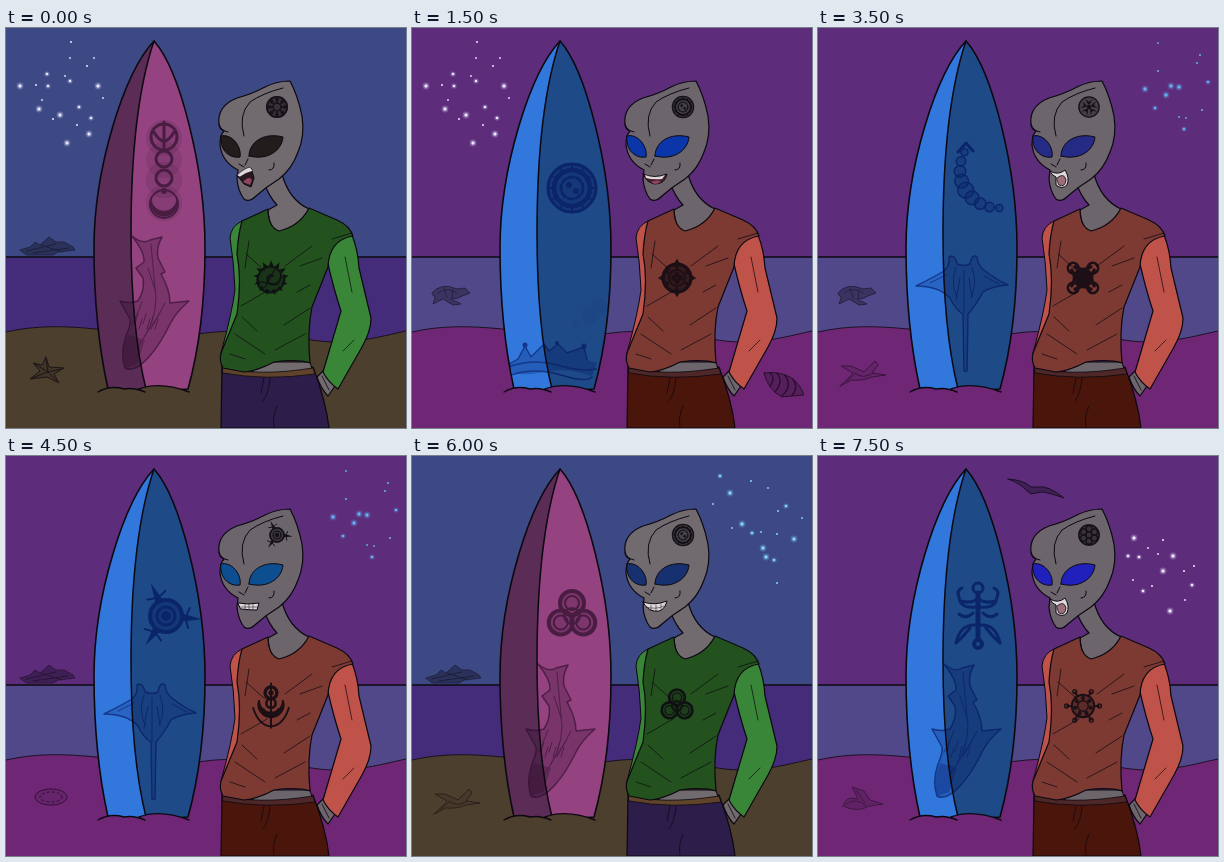
Animation of 400x400 px, one loop 8 s. Source, as an HTML page:

```html
<!DOCTYPE html>
<html lang="en">
<head>
<meta charset="utf-8">
<title>Alien surfer</title>
<style>
html, body { margin: 0; width: 100%; height: 100%; overflow: hidden; background: #000; }
svg { display: block; width: 100vw; height: 100vh; color: #0c0810; stroke-linejoin: round; stroke-linecap: round; }
</style>
</head>
<body>
<svg id="stage" viewBox="0 0 400 400"></svg>
<script>
const STEP = 500;
const INK = 'currentColor';

const path = (d, fill = 'none', stroke = 'none', width = 1, extra = '') =>
  `<path d="${d}" fill="${fill}" stroke="${stroke}" stroke-width="${width}" ${extra}/>`;
const line = (d, width = 1) => path(d, 'none', INK, width);
const dot = (x, y, r, fill = INK) => `<circle cx="${x}" cy="${y}" r="${r}" fill="${fill}"/>`;
const ring = (x, y, r, width = 2, dash = '') =>
  `<circle cx="${x}" cy="${y}" r="${r}" fill="none" stroke="${INK}" stroke-width="${width}" stroke-dasharray="${dash}"/>`;
const group = (body, transform = '', opacity = 1) =>
  `<g transform="${transform}" opacity="${opacity}">${body}</g>`;
const repeat = (n, draw) => Array.from({ length: n }, (_, i) => draw(i)).join('');
const around = (n, body, start = 0) => repeat(n, i => group(body, `rotate(${start + i * 360 / n})`));
const haze = (r, alpha = .35, y = 0) => `<circle cy="${y}" r="${r}" fill="${INK}" opacity="${alpha}"/>`;

const themes = {
  green: { sky: '#3c4985', sea: '#452c7a', sand: '#4d3f2d', boardL: '#5b2c56', boardR: '#944380', ink: '#2a0c28',
    shirt: '#23521f', sleeve: '#398638', pants: '#2d1d4a', belt: '#5f442b', skin: '#716a6e' },
  purple: { sky: '#5d2d7c', sea: '#504888', sand: '#6f2775', boardL: '#3277dc', boardR: '#1e4a88', ink: '#04165c',
    shirt: '#7c3a33', sleeve: '#bf5349', pants: '#4a150b', belt: '#4e2728', skin: '#6c656b' },
  blue: { sky: '#0c2583', sea: '#4f2669', sand: '#305286', boardL: '#034f67', boardR: '#36379f', ink: '#0a0d45',
    shirt: '#2c3787', sleeve: '#4355c8', pants: '#4c150b', belt: '#6a254b', skin: '#6d7a86' }
};

// Emblems are drawn around the origin with a radius of about 25.
const crescent = 'M-18 -8A19 19 0 1 0 18 -8A16 16 0 1 1 -18 -8Z';
const trefoilPart = haze(0) + group(haze(13, .3) + ring(0, 0, 12, 4) + ring(0, 0, 7, 2), 'translate(0 -13)');
const emblems = {
  mandala: haze(25, .45) + ring(0, 0, 24, 3) + ring(0, 0, 18, 5, '8 3') + ring(0, 0, 11, 3, '5 3') +
    around(12, line('M0 -24V-18', 2)) + dot(-3, -3, 3) + dot(4, 3, 3),
  wheel: haze(25, .65) + ring(0, 0, 23, 4) + ring(0, 0, 9, 3) + around(8, line('M0 -9V-18', 3) + dot(0, -17, 4)),
  nautilus: path('M20 -4C24 20 -4 30 -17 15C-29 -3 -9 -25 8 -15C23 -6 12 14 -1 9C-10 4 -4 -8 3 -3', INK, INK, 3, 'fill-opacity=".5"') +
    around(13, path('M-3 -18L0 -27L4 -18Z', INK)) + line('M-15 6L10 10M-9 14L6 -14', 2),
  totem: group([-50, -28, -8, 15].map(y => haze(18, .18, y)).join('') + ring(0, -51, 13, 3) + line('M0 -66V-40M-10 -56Q0 -38 10 -56', 3) +
    ring(0, -29, 8, 3) + ring(0, -10, 8, 3) + dot(0, 3, 3) + ring(0, 16, 14, 2) +
    path(crescent, INK, INK, 1, 'transform="translate(0 16) scale(.72)"'), 'translate(-2 0)'),
  gear: haze(23, .75) + ring(0, 0, 21, 5) + ring(0, 0, 12, 3) + around(4, dot(0, -5, 4) + path('M-5 -21L0 -29L5 -21Z', INK)) +
    around(6, dot(0, -17, 3)),
  beads: repeat(9, i => {
    const a = (i * 15 - 28) * Math.PI / 180, r = 8 - Math.abs(i - 4) * 1.1;
    const x = 20 - 38 * Math.cos(a), y = -18 + 38 * Math.sin(a);
    return `<circle cx="${x}" cy="${y}" r="${r}" fill="${INK}" fill-opacity=".35" stroke="${INK}" stroke-width="1.5"/>`;
  }) + line('M-20 -36L-12 -45L-5 -37', 3),
  moons: haze(24, .45) + ring(0, 0, 23, 3) + around(5, path('M-8 -20Q0 -5 8 -20Q4 -8 0 -5Q-5 -8 -8 -20', INK)) + dot(0, 0, 5),
  knot: dot(0, 0, 13) + around(4, ring(0, -21, 8, 4), 45) + around(4, line('M-12 -17Q0 -9 12 -17', 5)),
  spikes: haze(17, .5) + ring(0, 0, 16, 4) + ring(0, 0, 9, 3) + dot(0, 0, 5) +
    around(3, path('M-4 -16L0 -36L4 -16Z', INK) + line('M-10 -23Q0 -18 10 -23', 2), -25),
  altar: ring(0, -20, 9, 5) + dot(0, -20, 4) + ring(0, -4, 7, 4) + path(crescent, INK, INK, 3) +
    line('M-27 3Q-19 29 0 31Q19 29 27 3M-11 5Q0 20 11 5M0 -34V33', 3),
  waves: dot(-6, 5, 6) + ring(-6, 5, 10, 3) + line('M-14 -14A22 22 0 0 1 13 14M-10 -22A29 29 0 0 1 21 14M-23 0L-14 9M-20 16L-8 20', 5),
  pinwheel: haze(25, .15) + ring(0, 0, 25, 2) + around(6, path('M-11 -19L9 -19L15 -11L3 -10L-5 -6Z', INK)),
  dots: haze(13, .75) + around(10, dot(0, -20, 6) + ring(0, -20, 6, 2)) + ring(0, 0, 12, 3) + dot(0, 0, 7),
  trefoil: around(3, trefoilPart) + ring(0, 0, 8, 2),
  flower: haze(25, .6) + ring(0, 0, 23, 3) + around(6, ring(0, -14, 7, 3)) + ring(0, 0, 7, 3),
  glyph: repeat(2, i => group(line('M2 -9Q18 -7 19 -19Q22 -25 16 -28M2 9Q18 8 22 27Q14 20 8 12M0 -17Q8 -12 17 -15M5 -3Q12 4 19 -2', 3),
    `scale(${i ? -1 : 1} 1)`)) + ring(0, -28, 5, 3) + line('M0 -23V23', 5) + ring(0, 28, 4, 4),
  knobs: haze(18, .35) + ring(0, 0, 17, 3) + ring(0, 0, 8, 2) + around(7, dot(0, -12, 3)) +
    around(6, line('M0 -18V-24', 3) + ring(0, -25, 3, 2), 30)
};

const seaLife = {
  shark: path('M126 208Q137 217 144 212L156 209Q150 219 152 230L159 244L155 246Q164 262 164 275L183 273Q170 284 164 296Q154 317 142 330Q128 345 119 340Q114 325 120 308Q125 297 124 291L114 273Q124 276 132 273Q139 262 137 250L130 240L138 234Q139 224 126 208Z', INK, INK, 1.5, 'fill-opacity=".38"') +
    path('M119 340Q114 325 122 307L139 312L131 336Z', INK, 'none', 1, 'opacity=".55"') +
    line('M145 216Q148 250 150 270Q150 295 131 320M136 274Q130 290 126 296M159 275L145 301M154 285L138 309M142 240L149 262') +
    repeat(6, i => line(`M${132 + i * 4} ${286 + i % 2 * 5}l-3 10`, 1)),
  manta: path('M131 229Q137 226 139 236Q146 239 152 236Q154 225 159 229Q160 238 166 242Q177 251 190 257Q174 258 165 264Q158 277 150 286L149 343L146 343L145 286Q137 281 132 270Q121 258 98 258Q116 249 126 243Q132 238 131 229Z', INK, INK, 1.4, 'fill-opacity=".28"') +
    line('M138 239Q132 255 139 269M154 239Q160 256 153 270M146 242V285M142 250L138 272M151 250L154 269M128 247L112 255M166 248L181 256'),
  reef: path('M97 336L106 331L113 318L119 329L132 316L137 323L146 316L155 325L172 319L175 332L185 335L180 348Q155 339 132 344Q112 348 100 345Z', INK, 'none', 1, 'opacity=".4"') +
    line('M96 339Q122 330 145 337T184 341M99 347Q123 339 149 347T180 349M97 336L106 331L113 318L119 329L132 316L137 323L146 316L155 325L172 319L175 332', 1.4) +
    dot(113, 317, 2.5) + dot(145, 315, 2) + dot(172, 318, 2.5) +
    group(dot(178, 287, 9) + dot(187, 279, 8) + dot(164, 295, 4), '', .1)
};

const turtle = path('M-17 -2Q-8 -13 8 -6L16 -7L21 -2L13 1Q9 4 2 4L12 9L4 10L-6 4L-16 9L-14 3Z', INK, INK, 1, 'fill-opacity=".5"') +
  line('M-11 -2Q-2 -9 8 -2M-5 -7L-2 3M4 -6L3 3');
const scenery = {
  ship: group(path('M14 222L24 219L29 214L34 217L43 209L50 214L58 214L67 219L69 222L52 224L47 227L21 227Z', INK, INK, .8, 'fill-opacity=".55"') +
    line('M20 223L50 216M35 217L56 224M27 225L62 220'), '', .65),
  starfish: group(path('M40 329L43 339L58 340L48 346L53 355L41 349L24 351L34 343L27 335L36 337Z', INK, INK, 1, 'fill-opacity=".25"') +
    line('M40 331L42 344L55 341M42 344L51 353M42 344L26 350M42 344L29 336'), '', .75),
  turtle: group(turtle, 'translate(37 267)', .6),
  hatchling: group(path('M22 358Q31 350 35 345L23 338L33 338L46 344L57 333L60 337L54 345L68 347L54 349Q45 353 34 352Z', INK, INK, 1, 'fill-opacity=".18"') +
    line('M37 345Q45 352 55 345M29 353L38 345'), '', .55),
  shell: group(path('M352 345Q366 343 378 349Q388 355 392 367L370 369Q356 362 352 345Z', INK, INK, 1, 'fill-opacity=".35"') +
    line('M358 345Q364 350 358 358M365 345Q372 353 363 364M373 347Q381 358 370 368M381 351Q387 360 380 367', 1.5), '', .7),
  sandDollar: group(`<ellipse cx="45" cy="341" rx="16" ry="8" fill="${INK}" fill-opacity=".12" stroke="${INK}" stroke-dasharray="3 1"/>` +
    `<ellipse cx="45" cy="341" rx="11" ry="5" fill="none" stroke="${INK}" stroke-dasharray="2 3"/>`, '', .7),
  bird: group(path('M190 23Q206 24 213 31L220 31Q230 29 246 42Q232 37 224 36L213 38L209 35Q202 27 190 23Z', INK, INK, 1, 'fill-opacity=".45"'), '', .8),
  sandpiper: group(path('M372 293L377 291L382 295L396 300L386 302L379 299L377 295Z', INK, INK) + line('M383 301L381 308M386 301L388 307'), '', .55),
  crab: group(path('M25 350Q28 339 40 343L34 331L46 335L52 344L65 348L51 350Q40 357 25 350Z', INK, INK, 1, 'fill-opacity=".3"') +
    line('M28 348Q39 341 48 350M38 334L47 347'), '', .5)
};

const skies = {
  left: [14,58, 30,57, 42,58, 36,72, 33,81, 65,14, 41,46, 59,48, 92,58, 81,38, 64,53, 97,70, 54,87, 47,91, 73,79, 64,30, 83,106, 71,97, 85,90, 88,30, 61,115],
  low: [12,130, 53,117, 74,113, 98,123, 73,30, 78,37, 77,58, 81,74, 48,73, 33,81, 30,55, 19,74, 52,70, 45,83, 28,78, 72,101],
  right: [327,61, 340,43, 366,101, 368,90, 361,59, 382,27, 390,54, 340,15, 353,58, 384,82, 337,80, 361,89, 348,67, 379,35],
  wide: [318,37, 339,25, 308,20, 356,32, 382,83, 365,78, 340,77, 349,76, 354,101, 365,127, 362,104, 390,62, 330,68, 301,48, 374,50, 320,72, 351,92, 366,55],
  side: [316,82, 345,84, 321,101, 315,124, 345,115, 366,115, 374,129, 367,144, 352,155, 334,130, 310,100, 330,92, 355,100, 376,110, 325,135, 340,98]
};
const tints = { left: '#e9e6ff', low: '#d8deff', right: '#63b5f4', wide: '#86d6ff', side: '#f1e8ff' };

function drawStars(name) {
  const points = skies[name], tint = tints[name];
  return repeat(points.length / 2, i => {
    const x = points[2 * i], y = points[2 * i + 1], r = [1.7, 1, 1.3, .9][i % 4];
    return dot(x, y, r, tint) + (i % 2 ? '' : `<circle cx="${x}" cy="${y}" r="${r * 2}" fill="${tint}" opacity=".25"/>`);
  });
}

const TEETH = '#ded7db', LIP = '#8d4562';
const mouths = {
  talk: path('M231 147Q239 144 245 140L248 150L245 159L238 156L234 151Z', '#2b1720', INK) +
    path('M231 147Q239 140 244 139L247 143Q239 145 234 149Z', TEETH, INK, .6) + path('M237 154Q243 147 246 152L244 157Z', LIP),
  smile: path('M231 146Q242 151 255 146Q253 156 243 156Q235 155 231 146Z', '#4b2030', INK) +
    path('M233 147Q243 151 253 147L250 151Q241 152 234 150Z', TEETH) + path('M239 154Q246 151 249 154Q243 158 239 154Z', LIP),
  tongue: path('M232 143Q240 148 247 142Q252 150 249 157Q244 162 238 157L238 149Q234 148 232 143Z', TEETH, INK) +
    path('M239 150Q246 144 248 152Q247 160 241 157Z', '#9f6f79', INK, .8),
  grimace: path('M232 147Q242 149 253 147L251 154Q243 154 235 153Z', TEETH, INK) + line('M235 151H251M239 148V153M243 148V153M247 148V153', .5),
  grin: path('M231 146Q243 150 255 145Q252 157 242 155Q235 154 231 146Z', TEETH, INK) + line('M234 151Q244 154 252 150M239 149V154M244 149V155M249 148V153', .5)
};

const BOARD = 'M148 13C118 45 88 140 88 220C88 275 94 325 102 361Q141 365 182 361C192 325 199 275 199 220C199 140 174 42 148 13Z';
const STRINGER = 'M148 13C132 60 125 130 125 205C125 270 131 325 140 361';
const DUNES = 'M0 304C30 297 60 298 90 301S180 308 200 305S260 303 300 311S372 309 400 303';

function drawBeach(c) {
  return `<rect width="400" height="400" fill="${c.sky}"/>` +
    path('M0 229H400V400H0Z', c.sea) + line('M0 229H400', 1.5) +
    path(DUNES + 'V400H0Z', c.sand) + line(DUNES, .8);
}

function drawBoard(c, emblem, animal) {
  return path(BOARD, c.boardR) + path(STRINGER + 'L102 361C94 325 88 275 88 220C88 140 118 45 148 13Z', c.boardL) +
    `<g color="${c.ink}">` + group(emblems[emblem], 'translate(160 160)', .7) +
    `<g clip-path="url(#boardClip)" opacity=".65">${seaLife[animal]}</g></g>` +
    line(BOARD, 1.6) + line(STRINGER, 1.5) +
    path('M92 364Q104 357 118 361Q128 359 139 364L133 361Q154 353 183 364L182 370H98Z', c.sand) +
    line('M92 364Q104 357 118 361Q128 359 139 364M133 361Q154 353 183 364', 1.4);
}

function drawBody(c, emblem) {
  return path('M216 337L215 400H323Q320 373 307 339Z', c.pants, INK, 1.2) +
    path('M240 334H304L307 345L250 347Z', c.skin, INK) +
    path('M217 339Q250 349 307 340L309 346Q260 353 217 345Z', c.belt, INK, .8) +
    line('M264 350Q263 365 257 373M258 350L255 365M271 378Q266 389 268 399', .7) +
    path('M318 342L311 349Q315 361 322 368L329 358Z', c.skin, INK, 1.2) + line('M316 348L323 362', .8) +
    path('M236 193Q225 198 224 210Q228 234 229 262Q226 285 215 325L233 290L238 215Z', c.sleeve, INK) +
    path('M322 236L324 215L346 207Q352 222 353 240L365 290Q365 303 356 319L332 361Q322 354 317 344L335 283Q328 262 322 236Z', c.sleeve, INK, 1.2) +
    path('M257 152Q263 169 271 177L262 182Q263 200 272 205Q294 198 303 181C290 175 281 165 276 146Z', c.skin, INK, 1.2) +
    path('M236 193L262 181Q262 199 273 203Q294 198 303 180L331 192Q344 198 347 208Q323 212 322 239L306 279Q301 303 304 335Q291 331 268 334Q251 343 238 344L217 340Q213 333 215 325L231 286Q236 251 231 226Q232 207 236 193Z', c.shirt, INK, 1.2) +
    line('M243 213L239 240M240 226L259 243M306 218L279 238M316 230L294 238M235 278L261 263M236 289L251 303M304 280L278 297M299 306L269 322M229 306L259 326M224 326L239 331M304 257L291 264M339 229L346 264M348 312L337 323M326 211L346 205', .7) +
    group(emblems[emblem], 'translate(265 250) scale(.66)', .85);
}

function drawHead(c, eye, mouth, emblem) {
  return path('M213 96Q211 78 231 70Q246 66 259 59Q271 53 284 53Q292 68 296 88Q299 108 292 124Q286 141 273 151Q260 159 250 168Q243 175 238 171Q232 163 231 151L232 142Q216 134 214 117Q214 107 218 103Q213 101 213 96Z', c.skin, INK, 1.2) +
    line('M238 108Q232 87 244 74Q257 65 277 60M213 96Q215 103 222 104', 1) +
    path('M215 108C225 105 236 118 234 129C222 131 213 120 215 108Z', eye, INK) +
    path('M243 128C243 114 258 104 277 109C276 122 262 133 243 128Z', eye, INK) +
    line('M242 131L239 137M233 136L238 139M263 142Q269 142 268 135', 1) +
    mouths[mouth] + group(emblems[emblem], 'translate(271 79) scale(.44)', .9);
}

// theme, eyes, mouth, head emblem, chest emblem, board emblem, board animal, stars, scenery
const scenes = [
  ['green', '#231c1d', 'talk', 'wheel', 'nautilus', 'totem', 'shark', 'left', 'ship starfish'],
  ['green', '#17306f', 'smile', 'flower', 'knobs', 'mandala', 'shark', 'left', 'ship shell'],
  ['blue', '#0a30ac', 'grin', 'moons', 'dots', 'pinwheel', 'manta', 'left', 'turtle shell'],
  ['purple', '#0a36a9', 'smile', 'mandala', 'gear', 'mandala', 'reef', 'left', 'turtle shell'],
  ['purple', '#203395', 'grin', 'flower', 'dots', 'trefoil', 'shark', 'left', 'turtle hatchling'],
  ['blue', '#0b41a3', 'grimace', 'wheel', 'trefoil', 'spikes', 'manta', 'low', 'bird hatchling'],
  ['purple', '#2024a0', 'smile', 'spikes', 'knobs', 'pinwheel', 'manta', 'left', 'turtle hatchling'],
  ['purple', '#252b85', 'tongue', 'moons', 'knot', 'beads', 'manta', 'right', 'turtle hatchling'],
  ['blue', '#0a30ac', 'grin', 'flower', 'gear', 'trefoil', 'manta', 'right', 'ship sandDollar'],
  ['purple', '#0d4e91', 'grimace', 'spikes', 'altar', 'spikes', 'manta', 'right', 'ship sandDollar'],
  ['green', '#231c1d', 'smile', 'wheel', 'dots', 'pinwheel', 'shark', 'low', 'bird starfish'],
  ['blue', '#0b22b0', 'grin', 'waves', 'dots', 'pinwheel', 'shark', 'low', 'bird sandpiper'],
  ['green', '#17306f', 'grin', 'mandala', 'trefoil', 'trefoil', 'shark', 'wide', 'ship hatchling'],
  ['blue', '#0a34b0', 'grin', 'mandala', 'trefoil', 'trefoil', 'shark', 'wide', 'ship hatchling'],
  ['green', '#231c1d', 'tongue', 'flower', 'knobs', 'glyph', 'shark', 'side', 'bird crab'],
  ['purple', '#2021bd', 'tongue', 'flower', 'knobs', 'glyph', 'shark', 'side', 'bird crab']
];

const stage = document.getElementById('stage');
const defs = `<defs><clipPath id="boardClip"><path d="${BOARD}"/></clipPath></defs>`;

function drawScene([theme, eye, mouth, head, chest, emblem, animal, stars, items]) {
  const c = themes[theme];
  return defs + drawBeach(c) + drawStars(stars) + items.split(' ').map(item => scenery[item]).join('') +
    drawBoard(c, emblem, animal) + drawBody(c, chest) + drawHead(c, eye, mouth, head);
}

let shown = -1;
function render(time) {
  const index = Math.floor(time / STEP) % scenes.length;
  if (index !== shown) {
    shown = index;
    stage.innerHTML = drawScene(scenes[index]);
  }
}

const start = performance.now();
function tick() {
  render(performance.now() - start);
  requestAnimationFrame(tick);
}
tick();
</script>
</body>
</html>
```
